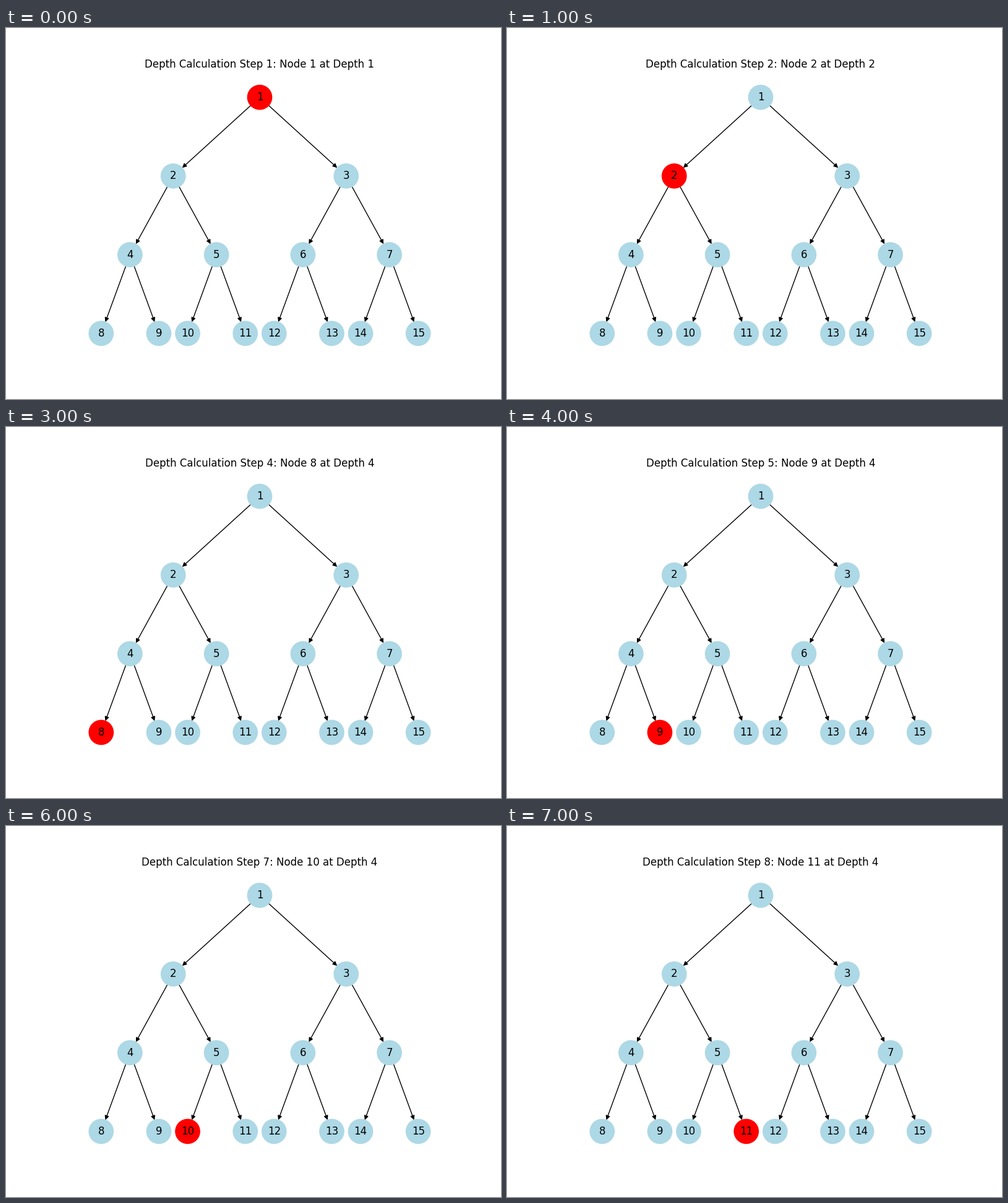
These frames come from a looping animation (800x600 px, 8 s). A matplotlib script:

```python
import matplotlib.pyplot as plt
from matplotlib.animation import FuncAnimation
from matplotlib.patches import FancyArrowPatch

NODE_SIZE = 800
LAST = 15
PAD = 1.21  # two nested 5% margins


def depth(node):
    return node.bit_length()


def position(node):
    """Children sit 1/depth to either side of their parent."""
    if node == 1:
        return 0.0, 0.0
    x, y = position(node // 2)
    side = 1 if node % 2 else -1
    return x + side / (depth(node) - 1), y - 1


def preorder(node=1):
    if node > LAST:
        return []
    return [node] + preorder(2 * node) + preorder(2 * node + 1)


nodes = range(1, LAST + 1)
pos = {n: position(n) for n in nodes}
visits = preorder()[:8]

fig, ax = plt.subplots(figsize=(8, 6), dpi=100)
ax.axis("off")
half_width = pos[LAST][0] * PAD
ax.set_xlim(-half_width, half_width)
ax.set_ylim(-1.5 - 1.5 * PAD, -1.5 + 1.5 * PAD)

margin = NODE_SIZE ** 0.5 / 2
for n in nodes[1:]:
    ax.add_patch(FancyArrowPatch(
        pos[n // 2], pos[n], arrowstyle="-|>", mutation_scale=10,
        shrinkA=margin, shrinkB=margin, color="black", linewidth=1, zorder=1))

xs, ys = zip(*pos.values())
dots = ax.scatter(xs, ys, s=NODE_SIZE, c=["lightblue"] * LAST, zorder=2)
for n in nodes:
    ax.text(*pos[n], str(n), size=12, ha="center", va="center", zorder=3)
title = ax.set_title("", fontsize=12)


def update(step):
    current = visits[step]
    colors = ["red" if n == current else "lightblue" for n in nodes]
    dots.set_facecolor(colors)
    dots.set_edgecolor(colors)
    title.set_text(f"Depth Calculation Step {step + 1}: "
                   f"Node {current} at Depth {depth(current)}")
    return dots, title


anim = FuncAnimation(fig, update, frames=len(visits), interval=1000,
                     repeat=True, repeat_delay=0)
plt.show()
```
